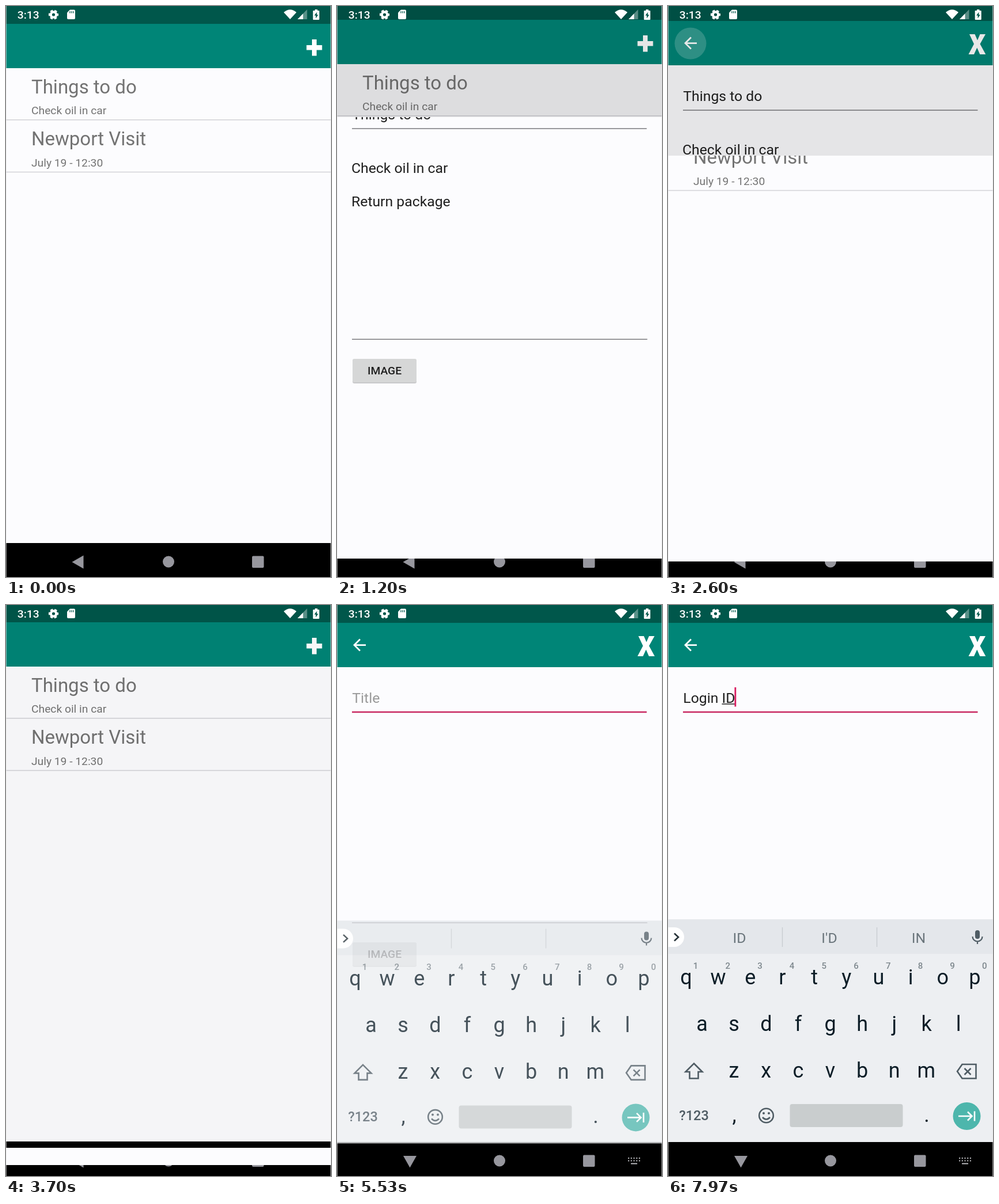
Write an HTML page that moves like this. It is 564 px wide and 992 px high and loops after 8000 ms.

```html
<!DOCTYPE html>
<html lang="en">
<head>
<meta charset="utf-8">
<title>Notes</title>
<style>
  html, body { margin: 0; width: 100%; height: 100%; overflow: hidden; background: #000; }
  svg { display: block; width: 100vw; height: 100vh; font-family: Roboto, "Noto Sans", sans-serif; }
  text { white-space: pre; }
  .mid { text-anchor: middle; }
  .medium { font-weight: 500; }
  .title { font-size: 33px; fill: #737373; }
  .sub { font-size: 19.25px; fill: #737373; }
  .field { font-size: 24.75px; fill: #1f1f1f; }
  .key { font-size: 36px; fill: #0c1d27; }
  .hint { font-size: 15px; fill: #7d878d; }
  .word { font-size: 24.75px; fill: #6a757b; }
  .line { fill: none; stroke: #4f5c64; stroke-width: 2.6; }
</style>
</head>
<body>
<svg viewBox="0 0 564 992" preserveAspectRatio="none">
  <defs>
    <clipPath id="reveal"><rect id="revealBox" width="564" height="1992"/></clipPath>
    <clipPath id="rowClip"><rect y="108" width="564" height="89"/></clipPath>
    <g id="frame">
      <rect width="564" height="933" fill="#fcfcfe"/>
      <rect width="564" height="31" fill="#00574b"/>
      <rect y="31" width="564" height="77" fill="#008577"/>
    </g>
    <g id="editorBar" fill="#fff">
      <path transform="translate(22.5 53) scale(1.375)" d="M20 11H7.83l5.59-5.59L12 4l-8 8 8 8 1.41-1.41L7.83 13H20z"/>
      <path d="M523 54h9.5l4.5 10.5 4.5-10.5h9.5l-9.5 17 9.8 18h-10l-5-11.5-5.3 11.5h-9.5l9.5-18z"/>
    </g>
    <g id="editorBody">
      <path d="M26 552H538.5" stroke="#77777b" stroke-width="1.4"/>
      <rect x="27" y="588" width="111" height="41" rx="3" fill="#000" opacity=".12"/>
      <rect x="27" y="587" width="111" height="41" rx="3" fill="#000" opacity=".14"/>
      <rect x="27" y="586" width="111" height="41" rx="2.7" fill="#d6d7d7"/>
      <text class="mid medium" x="82.5" y="613" font-size="19.25" fill="#1f1f1f">IMAGE</text>
    </g>
  </defs>

  <rect width="564" height="992" fill="#000"/>
  <g fill="#97979e">
    <path id="backKey"/>
    <circle cx="282" cy="965.5" r="10"/>
    <rect x="427" y="955.5" width="20.5" height="20.5" rx="2"/>
    <path id="imeKey" d="M505 961H526M505 965.5H526" stroke="#b9b9bd" stroke-width="2.2" stroke-dasharray="2.2 2.5"/>
    <path id="imeBar" d="M510 970.5H521" stroke="#b9b9bd" stroke-width="2"/>
  </g>

  <g id="pages">
    <g id="list">
      <use href="#frame"/>
      <path d="M531 58h8v10h9.5v8.5H539V86.5H531V76.5H521.5V68H531z" fill="#fff"/>
      <g clip-path="url(#rowClip)">
        <rect id="rowTint" y="108" width="564" height="89"/>
        <circle id="rowRipple" cx="282" cy="152"/>
      </g>
      <path d="M0 197.7H564M0 288.5H564" stroke="#d2d2d6" stroke-width="1.4"/>
      <text class="title" x="44" y="151.5">Things to do</text>
      <text class="sub" x="44" y="188">Check oil in car</text>
      <text class="title" x="44" y="242">Newport Visit</text>
      <text class="sub" x="44" y="278.7">July 19 - 12:30</text>
    </g>

    <g id="detail">
      <use href="#frame"/>
      <circle id="backRipple" cx="39" cy="70" fill="#fff" opacity=".2"/>
      <use href="#editorBar"/>
      <path d="M26 186H537.5" stroke="#77777b" stroke-width="1.4"/>
      <text class="field" x="26.3" y="169.5">Things to do</text>
      <text class="field" x="25" y="263.3">Check oil in car</text>
      <text class="field" x="25" y="320.5">Return package</text>
      <use href="#editorBody"/>
    </g>

    <g id="compose">
      <use href="#frame"/>
      <use href="#editorBar"/>
      <path d="M26 186H537.5" stroke="#c8265f" stroke-width="2.7"/>
      <text id="hint" class="field" x="26.3" y="169.5" style="fill:#999">Title</text>
      <text id="typed" class="field" x="26.3" y="169.5"></text>
      <path id="composing" stroke="#1f1f1f" stroke-width="1.5"/>
      <rect id="caret" y="143" width="2.8" height="33.5" fill="#d81b60"/>
      <use href="#editorBody"/>
    </g>
  </g>

  <g id="keyboard">
    <rect y="546" width="564" height="387" fill="#edeff2"/>
    <rect y="546" width="564" height="60" fill="#e4e7eb"/>
    <path d="M198.5 560V594M362.5 560V594" stroke="#c8cdd1" stroke-width="1.4"/>
    <path d="M0 560H11a17 17 0 0 1 0 34H0z" fill="#fff"/>
    <path d="M11 570.5l7 6.5-7 6.5" class="line" style="stroke:#263238"/>
    <rect x="533" y="565" width="8" height="15" rx="4" fill="#4f5c64"/>
    <path class="line" style="stroke-width:2.2" d="M528.5 576a8.5 8.5 0 0 0 17 0M537 584.5V589"/>
    <g id="words"></g>
    <g id="keys"></g>
    <path class="line" d="M45 796.5L59.5 811H52.5V822.5H37.5V811H30.5z"/>
    <path class="line" d="M510.5 798H534.5V822.5H510.5L502 810.3zM514.5 805l11 11m0-11l-11 11"/>
    <text class="mid medium" x="45" y="895" font-size="23.5" fill="#4f5c64">?123</text>
    <circle class="line" cx="170.5" cy="887" r="12.3"/>
    <path class="line" d="M164 890q6.5 7 13 0"/>
    <circle cx="166" cy="883" r="2" fill="#4f5c64"/>
    <circle cx="175" cy="883" r="2" fill="#4f5c64"/>
    <rect x="211.5" y="867" width="196" height="40" rx="4" fill="#c9cdce"/>
    <circle cx="518.5" cy="888" r="24" fill="#4db6ac"/>
    <path class="line" style="stroke:#fff" d="M504 888H527M520 880.5l7.5 7.5-7.5 7.5M532 879.5V896.5"/>
  </g>

  <g fill="#fff">
    <text class="medium" x="19.8" y="22.3" font-size="19.25">3:13</text>
    <circle cx="82.5" cy="15" r="4.7" fill="none" stroke="#fff" stroke-width="4.2"/>
    <circle cx="82.5" cy="15" r="7" fill="none" stroke="#fff" stroke-width="3.2" stroke-dasharray="4.3 3.03" stroke-dashoffset="2.15"/>
    <path d="M111 6.5h7q2 0 2 2V21q0 2-2 2h-10q-2 0-2-2V11.5z"/>
    <path d="M111 9v3.5M114 9v3.5M117 9v3.5" stroke="#00574b" stroke-width="1.3"/>
    <path d="M482 11Q493 1.5 504 11L493 23z"/>
    <path d="M522.5 6V23H506z" opacity=".35"/>
    <path d="M515.5 13.3V23H506z"/>
    <path d="M536 6h4.5v2H543q.7 0 .7.7V23q0 1-1 1h-9q-1 0-1-1V8.7q0-.7.7-.7H536z"/>
    <path d="M539.5 10.5l-4.5 6h2.6v5l4.2-6.3h-2.5z" fill="#00574b"/>
  </g>
  <path d="M.5 0V992M563.5 0V992" stroke="#e8e8e8" opacity=".6"/>
</svg>

<script>
const LOOP = 8000, HEIGHT = 992, SLIDE = 600;
const $ = id => document.getElementById(id);
const clamp = v => Math.max(0, Math.min(1, v));
const span = (t, from, length) => clamp((t - from) / length);
const set = (el, attrs) => { for (const k in attrs) el.setAttribute(k, attrs[k]); };

// Chained cubic curves: x is time, y is progress.
const bez = (a, b, c, d, s) => {
  const r = 1 - s;
  return r * r * r * a + 3 * r * r * s * b + 3 * r * s * s * c + s * s * s * d;
};
function ease(x, p) {
  let i = 0;
  while (i + 6 < p.length && x > p[i + 3][0]) i += 3;
  const at = (axis, s) => bez(p[i][axis], p[i + 1][axis], p[i + 2][axis], p[i + 3][axis], s);
  let lo = 0, hi = 1;
  for (let n = 0; n < 24; n++) {
    const m = (lo + hi) / 2;
    if (at(0, m) < x) lo = m; else hi = m;
  }
  return at(1, (lo + hi) / 2);
}
const STANDARD = [[0, 0], [.4, 0], [.2, 1], [1, 1]];
const EMPHASIZED = [[0, 0], [.05, 0], [.1333, .06], [.16667, .4], [.20833, .82], [.25, 1], [1, 1]];

const pages = { list: $('list'), detail: $('detail'), compose: $('compose') };
const changes = [
  { at: 1029, from: 'list', to: 'detail' },
  { at: 2455, from: 'detail', to: 'list' },
  { at: 3655, from: 'list', to: 'compose' }
];

const KEYS_UP = 5380, FOCUS = 3880;
const typing = [
  [FOCUS, '', ''],
  [5700, 'L', 'L Let Look'],
  [5840, 'Lo', 'Lo Look Love'],
  [5970, 'Log', 'Log Login Logic'],
  [6090, 'Logi', 'Logi Login Logic'],
  [6210, 'Login', 'Login Logins Logging'],
  [6430, 'Login ', 'and to info'],
  [7300, 'Login I', "I I'm I'll"],
  [7560, 'Login ID', "ID I'D IN"]
];

function addText(parent, cls, x, y, value) {
  const el = document.createElementNS('http://www.w3.org/2000/svg', 'text');
  set(el, { class: 'mid ' + cls, x, y });
  el.textContent = value;
  parent.appendChild(el);
  return el;
}
[['qwertyuiop', 31.5, 659], ['asdfghjkl', 59, 740], ['zxcvbnm', 114.5, 821]].forEach(([row, x, y], r) =>
  [...row].forEach((c, i) => {
    addText($('keys'), 'key', x + i * 55.65, y, c);
    if (!r) addText($('keys'), 'hint medium', 48 + i * 55.7, 632, (i + 1) % 10);
  }));
addText($('keys'), 'key', 115, 898, ',');
addText($('keys'), 'key', 449, 898, '.');
const words = [124, 280, 435].map(x => addText($('words'), 'word', x, 587, ''));

function drawPages(t) {
  const change = changes.filter(c => t >= c.at).pop();
  const x = change ? span(t, change.at, SLIDE) : 1;
  const top = change ? change.to : 'list';
  const under = x < 1 ? change.from : null;
  const move = ease(x, STANDARD), open = ease(x, EMPHASIZED);
  for (const name in pages) {
    const p = pages[name];
    p.style.display = name === top || name === under ? '' : 'none';
    p.removeAttribute('clip-path');
    set(p, { transform: 'translate(0 0)', opacity: 1 });
  }
  if (!under) return;
  if ($('pages').lastElementChild !== pages[top]) $('pages').appendChild(pages[top]);
  // Pages move by whole pixels.
  set(pages[under], {
    transform: `translate(0 ${Math.floor(-.02 * HEIGHT * move)})`,
    opacity: 1 - .1 * clamp(x * 425 / 117)
  });
  set(pages[top], {
    transform: `translate(0 ${Math.round(.041 * HEIGHT * (1 - move))})`,
    'clip-path': 'url(#reveal)'
  });
  set($('revealBox'), { y: Math.round(.959 * HEIGHT * (1 - open)) });
}

function drawTouches(t) {
  const first = t < 2000;
  set($('rowTint'), { opacity: first ? .022 * span(t, 500, 100) : 0 });
  set($('rowRipple'), {
    r: 300 * ease(span(t, 500, 450), STANDARD),
    opacity: first ? .06 * (1 - span(t, 980, 200)) : 0
  });
  set($('backRipple'), { r: 27.5 * ease(span(t, 1970, 225), STANDARD) });
}

function drawTyping(t) {
  const [since, text, options] = typing.filter(s => t >= s[0]).pop() || typing[0];
  const typed = $('typed');
  typed.textContent = text;
  $('hint').style.display = text ? 'none' : '';
  const left = 26.3, width = text ? typed.getComputedTextLength() : 0;
  const start = text.lastIndexOf(' ') + 1;
  const before = start ? typed.getSubStringLength(0, start) : 0;
  set($('composing'), { d: start < text.length ? `M${left + before} 172H${left + width}` : 'M0 0' });
  const lit = t >= since && Math.floor((t - since) / 500) % 2 === 0;
  set($('caret'), { x: Math.max(26.6, left + width - 1), opacity: lit ? 1 : 0 });
  const list = options.split(' ');
  words.forEach((w, i) => { w.textContent = list[i] || ''; });
}

function drawKeyboard(t) {
  const ime = t >= 4700;
  set($('backKey'), { d: ime ? 'M115 957H138L126.5 977.5z' : 'M114.5 966L134.5 954.5V977.5z' });
  $('imeKey').style.display = $('imeBar').style.display = ime ? '' : 'none';
  const p = span(t, KEYS_UP, 200), up = 1 - (1 - p) ** 2;
  $('keyboard').style.display = p > 0 ? '' : 'none';
  set($('keyboard'), { transform: `translate(0 ${40 * (1 - up)})`, opacity: p });
}

function draw(t) {
  drawPages(t);
  drawTouches(t);
  drawTyping(t);
  drawKeyboard(t);
}

const begin = performance.now();
function tick() {
  draw((performance.now() - begin) % LOOP);
  requestAnimationFrame(tick);
}
tick();
</script>
</body>
</html>
```
